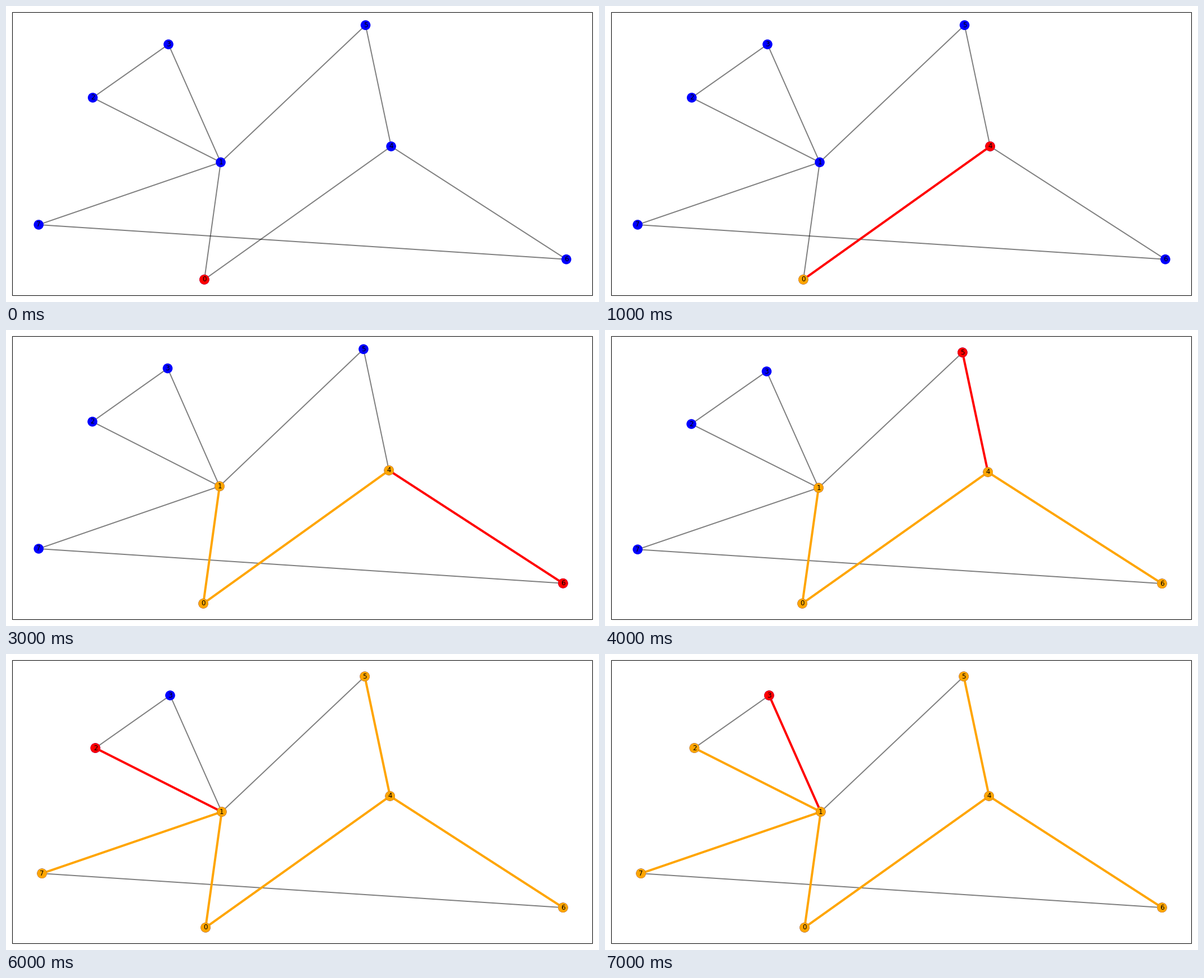
A matplotlib script that plays this animation: 1058 px wide and 529 px high, repeating every 8000 ms.

```python
import matplotlib.pyplot as plt
import numpy as np
from matplotlib.animation import FuncAnimation
from matplotlib.patches import Circle, Rectangle

W, H, DPI = 1058, 529, 72
STEP_MS = 1000
INSET = 11.2          # gap between the stage and the plot area
NODE_RADIUS = 8.8
GROWTH = 5.9          # extra margin once an outermost node is highlighted

# Node places as fractions of the layout, y pointing down
PLACES = np.array([
    (0.314, 1), (0.345, 0.539), (0.1025, 0.285), (0.246, 0.0755),
    (0.668, 0.4765), (0.6195, 0), (1, 0.9205), (0, 0.7845),
])
EDGES = [tuple(map(int, pair))
         for pair in "04 01 46 45 17 12 13 15 23 67".split()]


def breadth_first(root):
    """List (parent, node) pairs in visiting order."""
    visits, seen = [(None, root)], {root}
    for _, parent in visits:
        for edge in EDGES:
            if parent in edge:
                node = sum(edge) - parent
                if node not in seen:
                    seen.add(node)
                    visits.append((parent, node))
    return visits


VISITS = breadth_first(0)

fig = plt.figure(figsize=(W / DPI, H / DPI), dpi=DPI, facecolor="white")
ax = fig.add_axes([0, 0, 1, 1])


def layout(step):
    """Fit the nodes to the stage; each side gives way to a visited node."""
    visited = [node for _, node in VISITS[:step + 1]]
    size = np.array([W, H])
    margin = INSET + (size - 2 * INSET) * 0.05 / 1.1
    reached = PLACES[visited]
    low = margin + GROWTH * (reached.min(axis=0) == 0)
    high = size - margin - GROWTH * (reached.max(axis=0) == 1)
    return low + PLACES * (high - low)


def draw_edges(pos, edges, **style):
    for a, b in edges:
        ax.plot(*zip(pos[a], pos[b]), solid_capstyle="butt", zorder=1, **style)


def draw_nodes(pos, nodes, color):
    for n in nodes:
        ax.add_patch(Circle(pos[n], NODE_RADIUS, fc=color, lw=0, zorder=2))


def update(step):
    ax.clear()
    ax.set(xlim=(0, W), ylim=(H, 0))
    ax.axis("off")
    edge = INSET + 0.3
    ax.add_patch(Rectangle((edge, edge), W - 2 * edge, H - 2 * edge,
                           fill=False, lw=1, snap=False, zorder=4))
    pos = layout(step)
    done, current = VISITS[:step], VISITS[step]

    draw_edges(pos, EDGES, color="black", lw=2, alpha=0.5)
    draw_edges(pos, done[1:], color="orange", lw=4)
    if step:
        draw_edges(pos, [current], color="red", lw=4)

    draw_nodes(pos, range(len(PLACES)), "blue")
    draw_nodes(pos, [n for _, n in done], "orange")
    draw_nodes(pos, [current[1]], "red")
    for n, (x, y) in enumerate(pos):
        ax.text(x, y, str(n), fontsize=12, family="DejaVu Sans",
                color="black", ha="center", va="center", zorder=3)
    return []


anim = FuncAnimation(fig, update, frames=len(VISITS), init_func=lambda: [],
                     interval=STEP_MS, repeat=True, repeat_delay=0)
plt.show()
```
